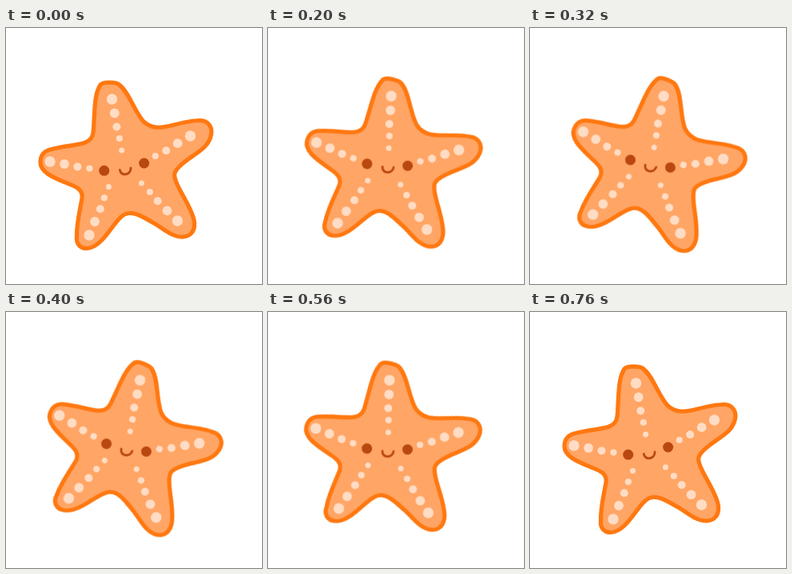
Animation, 320 px wide and 320 px high, one loop 800 ms. Source, as an HTML page without scripts:

```html
<!DOCTYPE html>
<html lang="en">
<head>
<meta charset="utf-8">
<title>Starfish</title>
<style>
  html, body { margin: 0; width: 100%; height: 100%; overflow: hidden; background: #fff; }
  svg { display: block; width: 100%; height: 100%; }

  /* A small negative delay keeps each step clear of its 40 ms boundary. */
  .starfish {
    transform-origin: 159.7px 179px;
    animation: sway 800ms -3ms infinite;
  }
  @keyframes sway {
    0%   { transform: rotate(0deg);  animation-timing-function: steps(9); }
    45%  { transform: rotate(24deg); animation-timing-function: steps(10); }
    95%, 100% { transform: rotate(0deg); }
  }

  .body { fill: #ffa565; stroke: #ff7810; stroke-width: 5.2; stroke-linejoin: round; }
  .dots { fill: #ffdcc4; }
  .eyes { fill: #b9480f; }
  .mouth { fill: none; stroke: #b9480f; stroke-width: 2.8; stroke-linecap: round; }
</style>
</head>
<body>
<svg viewBox="0 0 320 320">
  <g class="starfish">
    <path class="body" d="M118 71 C121 67.5 136 67 141 70.5
      C154 80 160 104 172 117 C182 126 192 125.5 208 121.5
      C222 118 236 115.5 243 115.5 C253 116 258 124 256.5 133
      C254 147 243 153 233.5 160 C220 169 210.5 178 210.5 184
      C211 192 217 202 221.5 210 C227 220 235.5 235 235.5 244
      C236 255.5 229 261.5 219 261 C206 260.5 194 249 185 244
      C173 237 163 231 154 231.5 C141 232 133 252 119 266
      C113 272 106 275.5 101 275.5 C92 275.5 87.5 269 88.5 261
      C88 244 92.5 228 95 213 C97 200 84 197.5 74 193
      C62 188 43 181 43 168 C43 158 48 153.5 57 151.5
      C72 147.5 87 147 98 143.5 C111 139 109 130 110 116
      C111 98 111 82 118 71 Z"/>
    <g class="dots">
      <!-- top arm -->
      <circle cx="132.5" cy="89" r="6.7"/>
      <circle cx="135.7" cy="106.5" r="5.9"/>
      <circle cx="138.3" cy="123.5" r="5"/>
      <circle cx="141.8" cy="138" r="4.1"/>
      <circle cx="144.6" cy="153" r="3.5"/>
      <!-- right arm -->
      <circle cx="230.4" cy="135" r="6.7"/>
      <circle cx="214.6" cy="144.2" r="5.9"/>
      <circle cx="200.2" cy="153.2" r="5"/>
      <circle cx="186.7" cy="160" r="4.1"/>
      <!-- lower right arm -->
      <circle cx="214.4" cy="241" r="6.7"/>
      <circle cx="201.5" cy="228.3" r="5.9"/>
      <circle cx="189.6" cy="216.2" r="5"/>
      <circle cx="179.8" cy="205" r="4.1"/>
      <circle cx="169.4" cy="194" r="3.5"/>
      <!-- lower left arm -->
      <circle cx="104" cy="259" r="6.7"/>
      <circle cx="111" cy="242" r="5.9"/>
      <circle cx="117.8" cy="226.3" r="5"/>
      <circle cx="122.8" cy="212.3" r="4.1"/>
      <circle cx="128.4" cy="198.4" r="3.5"/>
      <!-- left arm -->
      <circle cx="55" cy="167" r="6.7"/>
      <circle cx="73" cy="170" r="5.9"/>
      <circle cx="89.4" cy="173.4" r="5"/>
      <circle cx="104.4" cy="175.5" r="4.1"/>
    </g>
    <g class="eyes">
      <circle cx="122.7" cy="178.3" r="6.5"/>
      <circle cx="172.6" cy="169" r="6.5"/>
    </g>
    <path class="mouth" d="M142.3 177.5 C143.5 186 156.5 184 156 175"/>
  </g>
</svg>
</body>
</html>
```
